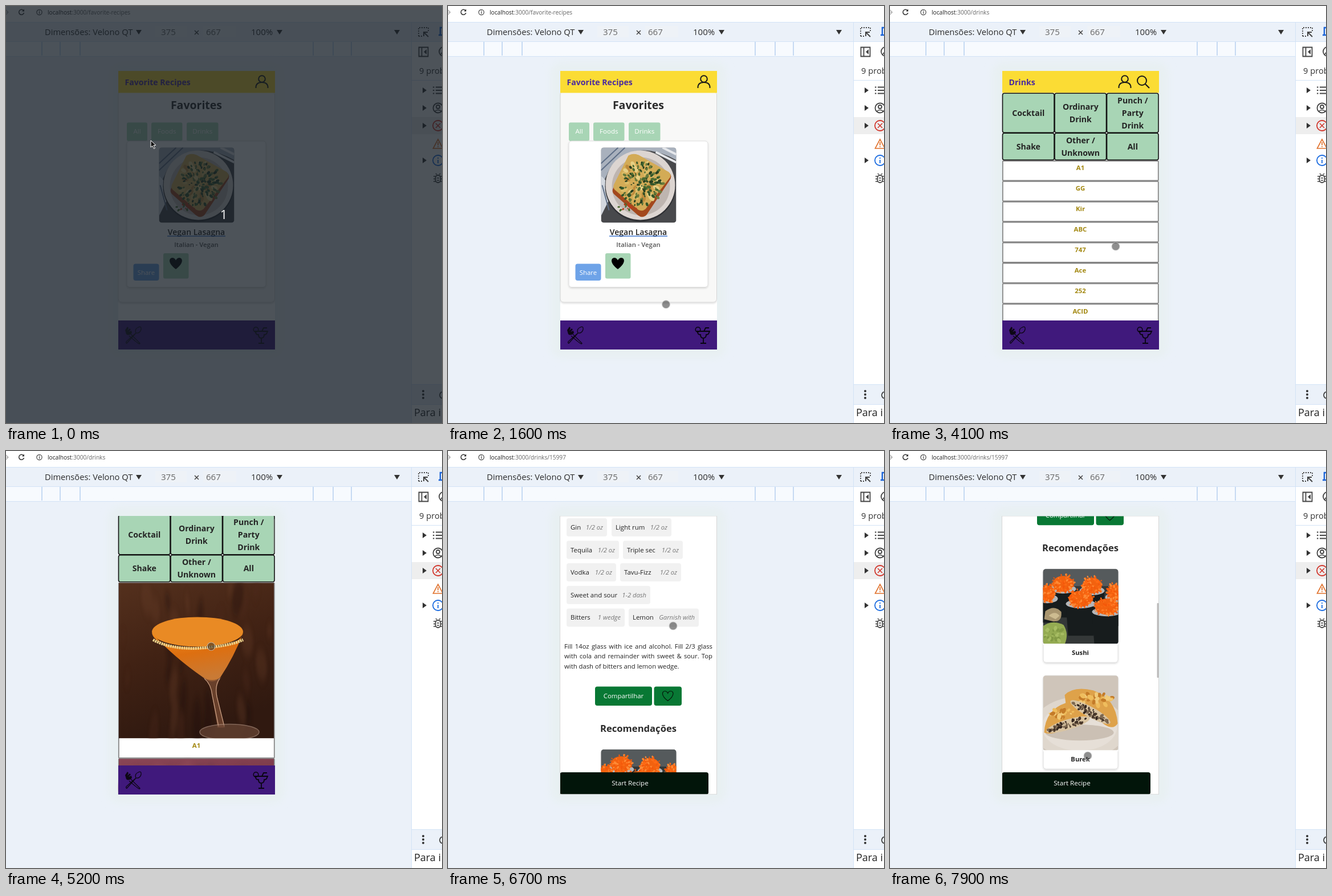
Recreate the animation shown at these times as an HTML page. Size 765 px wide and 732 px high, loop 8 s.

```html
<!DOCTYPE html>
<html lang="en">
<head>
<meta charset="utf-8">
<title>Recipe app walkthrough</title>
<style>
  html, body { margin: 0; width: 100%; height: 100%; overflow: hidden; background: #ebf1f9; }
  svg { display: block; width: 765px; height: 732px; font-family: "Open Sans", "Noto Sans", sans-serif; }
  .steps { font: 11.3px/17.7px "Open Sans", "Noto Sans", sans-serif; color: #222; white-space: nowrap; }
  .justify { text-align: justify; text-align-last: justify; white-space: normal; }
</style>
</head>
<body>
<svg id="stage" viewBox="0 0 765 732" xmlns="http://www.w3.org/2000/svg"></svg>
<script>
const rect = (x, y, w, h, fill, extra = '') =>
  `<rect x="${x}" y="${y}" width="${w}" height="${h}" fill="${fill}" ${extra}/>`;
const text = (x, y, s, size, fill = '#222', extra = '') =>
  `<text x="${x}" y="${y}" font-size="${size}" fill="${fill}" ${extra}>${s}</text>`;
const mid = (x, y, s, size, fill, extra = '') => text(x, y, s, size, fill, 'text-anchor="middle" ' + extra);
const shape = (d, fill, extra = '') => `<path d="${d}" fill="${fill}" ${extra}/>`;
const line = (d, color, w = 1.6, extra = '') => shape(d, 'none', `stroke="${color}" stroke-width="${w}" ${extra}`);
const oval = (x, y, rx, ry, fill, extra = '') =>
  `<ellipse cx="${x}" cy="${y}" rx="${rx}" ry="${ry}" fill="${fill}" ${extra}/>`;
const group = (s, extra = '') => `<g ${extra}>${s}</g>`;
const at = (x, y, s, extra = '') => group(s, `transform="translate(${x} ${y})" ${extra}`);
const bold = 'font-weight="700"', semi = 'font-weight="600"', italic = 'font-style="italic"';

function random(seed) {
  return () => (seed = (seed * 16807) % 2147483647) / 2147483647;
}

// Scatter small blobs inside an ellipse.
function specks(n, seed, cx, cy, rx, ry, size, colors) {
  const next = random(seed);
  let out = '';
  for (let i = 0; i < n; i++) {
    const a = next() * 6.283, d = Math.sqrt(next()), r = size * (0.5 + next());
    const x = cx + Math.cos(a) * d * rx, y = cy + Math.sin(a) * d * ry;
    out += oval(x.toFixed(1), y.toFixed(1), r.toFixed(1), (r * 0.65).toFixed(1),
      colors[i % colors.length], `transform="rotate(${Math.round(a * 57)} ${x.toFixed(1)} ${y.toFixed(1)})"`);
  }
  return out;
}

const userIcon = (x, y) => at(x, y,
  line('M-10.5 11v-1c0-6 4-9 10.5-9s10.5 3 10.5 9v1', '#181818', 2) +
  `<circle cy="-5" r="5.8" fill="none" stroke="#181818" stroke-width="2"/>`);
const searchIcon = at(444, 133, `<circle cx="-2" cy="-2" r="8" fill="none" stroke="#181818" stroke-width="2"/>` +
  line('M4 4l7 7', '#181818', 2.2));
const heart = 'M0 10C-15-1-12-10-6-10Q-2-10 0-5.500Q2-10 6-10C12-10 15-1 0 10Z';
const caret = (x, y) => shape(`M${x - 5} ${y - 4}h10l-5 8z`, '#333');
const arrow = y => shape(`M731 ${y - 5}l7 5l-7 5z`, '#333');
const ring = (x, y, r, color, w = 1.8) => `<circle cx="${x}" cy="${y}" r="${r}" fill="none" stroke="${color}" stroke-width="${w}"/>`;

function browser() {
  const edge = '#d3e3f6';
  return rect(0, 0, 765, 732, '#ebf1f9') + rect(0, 0, 765, 28, '#fff') + rect(0, 28, 765, 1, edge) +
    line('M-4 11h8m-4-4l4 4l-4 4', '#aaa', 1.2) +
    line('M31 8.500A4.500 4.500 0 1 0 31.500 12', '#333', 1.5) + shape('M28 9.500h4v-4z', '#333') +
    ring(58.5, 11, 4.6, '#444', 1.2) + rect(57.9, 10.3, 1.3, 3.3, '#444') + rect(57.9, 8, 1.3, 1.4, '#444') +
    `<text x="73" y="15" font-size="10.15" fill="#222">localhost<tspan id="path" fill="#666"></tspan></text>` +
    text(68, 51, 'Dimensões: Velono QT', 14.7, '#2b2b2b') + caret(233, 46) +
    rect(262, 35, 55, 20, '#eef2f7') + rect(346, 35, 58, 20, '#eef2f7') +
    text(272, 51, '375', 15, '#666') + line('M331 43l7 7m0-7l-7 7', '#444', 1.5) + text(351, 51, '667', 15, '#666') +
    text(430, 51, '100%', 15, '#2b2b2b') + caret(480, 46) + caret(686, 46) +
    rect(0, 62, 711, 27, '#f7fafe') + rect(0, 62, 765, 1, edge) + rect(0, 88, 711, 1, edge) +
    [63, 95, 130, 539, 574, 606].map(x => rect(x - 1, 63, 2, 24, '#c6daf3')).join('') +
    rect(180, 98, 308, 520, '#e8f0f2', 'rx="20" filter="url(#glow)"') + devtools(edge);
}

function devtools(edge) {
  const dark = '#454545';
  let out = rect(711, 63, 54, 669, '#fff') + rect(711, 28, 1, 704, edge) + rect(712, 130, 53, 1, edge) +
    rect(712, 195, 53, 30, '#eee') + rect(712, 664, 53, 36, '#ebf1f9') + rect(712, 664, 53, 1, edge) + rect(712, 699, 53, 1, edge);
  out += line('M724 53v-15h17v6M724 53h6', dark, 1.8, 'stroke-dasharray="2 2"') + line('M741 54l-8-8m0 7v-7h7', dark, 2);
  out += line('M768 38h-6v13m-3 0h8', '#1a63d8', 2.4);
  out += line('M724.500 72.500h16v16h-16zM729.500 72v17', dark, 1.8) + shape('M738 76v9l-5-4.500z', dark);
  out += ring(768, 80, 8, dark) + line('M762 86l8-11', dark);
  out += text(725, 119, '9 prob', 14.7, '#333') + [148, 179, 210, 271].map(arrow).join('');
  out += [142.5, 148, 153.5].map(y => rect(749, y - 1, 2.5, 2, dark) + rect(754, y - 1, 12, 2, dark)).join('');
  out += ring(758, 179, 8.5, dark) + ring(758, 177, 3, dark) + line('M752 185q6-5 12 0', dark);
  out += ring(758, 210, 9, '#d2362b') + line('M754 206l8 8m0-8l-8 8', '#d2362b');
  out += line('M758 234l8.500 16h-17z', '#e0702a') + rect(757.2, 239, 1.7, 5.5, '#e0702a') + rect(757.2, 246, 1.7, 1.8, '#e0702a');
  out += ring(758, 271, 9, '#1a6be0') + rect(757.1, 270, 1.8, 6, '#1a6be0') + rect(757.1, 266, 1.8, 2, '#1a6be0');
  out += rect(753.5, 297, 9, 13, 'none', `rx="4.500" stroke="${dark}" stroke-width="1.8"`) +
    line('M750 299h4m8 0h4m-16 4.500h4m8 0h4m-16 4.500h4m8 0h4M754 294l2 2m6-2l-2 2M756 302h4m-4 4h4', dark, 1.5);
  out += [676, 682, 688].map(y => oval(732, y, 2, 2, '#333')).join('') + ring(767, 683, 6, dark);
  return out + text(716, 720, 'Para i', 18, '#222');
}

const nav = rect(197, 552, 275, 51, '#40197c') +
  at(223, 577, line('M-4-1L11 14Q13 16 11 16Q9 16-7 2', '#0c0714', 1.3) +
    shape('M-14-8l4-6l2 2l-2 5l4-4l2 2l-4 4l5-2l1 4q-6 6-10 2z', '#0c0714') +
    line('M5-3Q2-10 9-13Q15-16 14-9Q12-2 5-3L-11 15Q-13 15-12 12Z', '#0c0714', 1.3)) +
  at(448, 577, line('M-11-6H11L9-1.500Q8 0 5 0Q5 6 0 6Q-5 6-5 0Q-8 0-9-1.500ZM0 6v9m-5 0h10M1-6l3-6h6', '#080510', 1.8) +
    ring(-9.5, -9, 4.3, '#080510', 1.6));

const header = (title, icons) => rect(197, 114, 275, 38.5, '#fbdc34') +
  text(208.5, 138.5, title, 14.1, '#4b2a9e', bold) + icons;

function lasagna() {
  return rect(0, 0, 132, 132, '#48494c') +
    shape('M0 0H132V22Q90-2 52 8Q16 24 0 72Z', '#a9b1bd') + shape('M0 50Q16 60 14 92L0 120Z', '#d3d8df') +
    line('M0 28L30 0M0 40L42 0M2 66L14 110M8 60L20 104', '#5f6f87', 2) + line('M96 8L132 26M108 0L132 12', '#e6e8ec', 4) +
    oval(69, 68, 62, 62, '#2f3034') + oval(69, 66, 61, 61, '#dcd5d1') + oval(70, 68, 51, 51, '#beb5b0') +
    shape('M48 15Q56 9 66 14L120 45Q126 50 120 58L80 118Q73 125 65 119L23 82Q18 77 22 70Z', '#a3481d') +
    shape('M48 14Q56 9 66 13L119 43Q125 49 119 55L78 108Q72 113 65 109L24 74Q20 70 23 64Z', '#d3ab56') +
    specks(40, 5, 72, 60, 36, 36, 5, ['#e6cf83', '#dcbd68', '#bf8b3c']) +
    specks(140, 17, 71, 64, 38, 39, 2.6, ['#33562a', '#4c6b32', '#283f20', '#6a7a3c']) +
    specks(16, 8, 48, 104, 20, 9, 2.4, ['#b93c1b', '#486a2d']);
}

function sushi() {
  const roll = (x, y, w, h, seed) => shape(`M${x - w} ${y}L${x - w + 4} ${y + h}H${x + w - 3}L${x + w} ${y}Z`, '#171c1d') +
    oval(x, y, w, 8, '#b4b6b9') + oval(x, y - 9, w - 5, 14, '#f2620f') +
    specks(80, seed, x, y - 9, w - 3, 17, 1.9, ['#ff6a14', '#f4580a', '#ff8a35']);
  return rect(0, 0, 132, 132, '#343838') + rect(0, 0, 132, 30, '#555a5c') +
    roll(35, 35, 23, 50, 11) + roll(86, 38, 22, 45, 23) + roll(8, 52, 18, 42, 41) + roll(126, 50, 17, 50, 35) +
    roll(66, 61, 26, 56, 59) + roll(112, 75, 26, 58, 71) +
    shape('M4 74Q20 62 32 75Q34 93 18 92L2 88Z', '#a8956f') + shape('M10 82Q21 72 29 82L22 88Z', '#cdbb90') +
    shape('M0 100Q16 88 36 98Q46 114 38 132H0Z', '#94ab52') + specks(24, 6, 18, 114, 18, 14, 3, ['#a7bd63', '#829a45']);
}

function burek() {
  const crust = ['#efbd5d', '#c47b28', '#f1ca78'], meat = ['#33261f', '#4b392c', '#7c6750'];
  const slice = (outline, top, seed, cx, cy, angle) => shape(outline, '#dea24a') + top +
    group(oval(cx, cy, 40, 9, '#d9c4a2') + specks(60, seed, cx, cy, 36, 6, 2.4, meat), `transform="rotate(${angle} ${cx} ${cy})"`);
  return rect(0, 0, 132, 132, '#cfc5ba') + oval(64, 92, 82, 55, '#dfd7cd') + oval(64, 90, 66, 42, '#e6dfd7') +
    oval(64, 100, 60, 14, '#cbc0b4') +
    slice('M2 100Q4 60 40 48Q64 44 84 68Q70 84 42 92Q14 106 2 100Z', specks(24, 31, 32, 65, 22, 9, 4, crust), 9, 44, 86, -17) +
    slice('M38 34Q54 18 88 26Q128 40 131 84Q124 96 108 86Q72 58 40 50Z', specks(30, 13, 92, 42, 30, 11, 4, crust), 29, 83, 64, 29);
}

const photo = (x, y, art) => at(x, y, art, 'clip-path="url(#square)"');

function favorites() {
  const tab = (x, w, s) => rect(x, 204.5, w, 32.5, '#a8d5b5', 'rx="3"') + mid(x + w / 2, 224, s, 11.6, '#fff');
  return rect(197, 114, 275, 489, '#fff') +
    rect(197, 150, 274.5, 370, '#f8f8f7', 'rx="6" stroke="#d5d5d5" filter="url(#shadow)"') +
    header('Favorite Recipes', userIcon(449, 133)) + mid(334, 181, 'Favorites', 19.5, '#2b2b2b', bold) +
    tab(212, 36, 'All') + tab(255, 54.5, 'Foods') + tab(317, 55.5, 'Drinks') +
    rect(212, 237, 244, 256.5, '#fff', 'rx="5" stroke="#ddd" filter="url(#shadow)"') +
    photo(268.5, 248.5, lasagna()) +
    mid(334, 402, 'Vegan Lasagna', 14, '#222', semi) + rect(283, 403.3, 102, 1.3, '#2463c8') +
    mid(334, 423, 'Italian - Vegan', 11.3, '#555', semi) +
    rect(223.5, 452.5, 45, 29.5, '#6ea3e8', 'rx="4"') + mid(246, 471.5, 'Share', 11.4, '#fff') +
    rect(276, 434, 44.5, 44.5, '#a8d5b5', 'rx="3"') + at(298, 452, shape(heart, '#000')) + nav;
}

function martini() {
  const grain = group(specks(50, 53, 272, 28, 260, 130, 16, ['#69402a', '#1a0d08', '#4f2c1a']),
    'opacity=".3" filter="url(#soft)" transform="translate(198 300) scale(.5 2)"');
  return group(rect(198, 272, 272, 273, 'url(#wood)') + grain +
    oval(336, 358, 80, 26, '#e98a24') +
    shape('M256 360Q262 386 336 386Q410 386 416 360Q400 402 376 438Q362 452 346 438Q294 402 256 360Z', 'url(#juice)') +
    shape('M344 437Q362 448 378 437Q367 452 370 470L384 526H371L361 466Q359 448 344 437Z', '#7a4c34', 'opacity=".75"') +
    line('M348 440Q360 450 362 470L373 524M375 440Q366 452 370 472L383 524', '#c79c80', 1.3) +
    line('M258 372Q288 388 334 387Q390 384 416 372', '#edd28b', 5, 'stroke-dasharray="3 1"') +
    oval(392, 534, 52, 14, '#75503f', 'opacity=".6" stroke="#b99a88" stroke-width="1.500"'), 'clip-path="url(#firstPhoto)"');
}

function tumbler() {
  let ridges = '';
  for (let i = 0; i < 24; i++) {
    const y = 692 + i * 5, half = 73 - i * 1.25;
    ridges += `M${335 - half} ${y}Q335 ${y + 13} ${335 + half} ${y}`;
  }
  const mottle = (seed, y, ry, colors) => group(specks(70, seed, 334, y, 132, ry, 9, colors), 'opacity=".3" filter="url(#soft)"');
  return rect(198, 581, 272, 104, 'url(#wall)') + mottle(77, 630, 42, ['#9a5260', '#5f3546']) +
    rect(198, 685, 272, 170, 'url(#table)') + mottle(37, 748, 50, ['#d29552', '#94592b']) +
    shape('M254 660Q335 700 416 660L382 800Q335 820 288 800Z', '#c09a62', 'opacity=".85"') +
    shape('M266 690Q335 704 404 690L380 798Q335 814 291 798Z', 'url(#drink)') +
    oval(335, 658, 80, 27, '#9c6858', 'stroke="#c8a596" stroke-width="2.500"') + oval(335, 670, 68, 16, '#bf9760') +
    group(specks(14, 19, 342, 672, 40, 10, 11, ['#dcc697', '#b08a50', '#cfb585']), 'opacity=".65"') +
    group(oval(350, 714, 30, 30, '#d9c084') + oval(345, 775, 26, 22, '#a87c0c'), 'opacity=".7" filter="url(#soft)"') +
    line(ridges, '#e0cb92', 1, 'opacity=".5"') +
    line('M256 668L290 800M414 668L382 800', '#d6b892', 2, 'opacity=".6"');
}

function drinks() {
  const cell = (x, y, h, ...rows) => rect(x, y, 90.5, h, '#a8d5b5', 'rx="3" stroke="#111" stroke-width="1.6"') +
    rows.map((s, i) => mid(x + 45.3, y + h / 2 + 5 + (i - (rows.length - 1) / 2) * 22, s, 14.1, '#242424', bold)).join('');
  const row = (y, h, name) => rect(197.8, y + 1, 273, h - 1.5, '#fff', 'rx="1" stroke="#858585" stroke-width="1.8"') +
    mid(334, y + h - 18.5, name, 11.4, '#a2870f', bold);
  const names = ['A1', 'GG', 'Kir', 'ABC', '747', 'Ace', '252', 'ACID'];
  return rect(197, 114, 275, 489, '#fff') + group(
    header('Drinks', userIcon(412, 133) + searchIcon) +
    group(cell(197.5, 153.3, 69, 'Cocktail') + cell(289, 153.3, 69, 'Ordinary', 'Drink') +
      cell(380.5, 153.3, 69, 'Punch /', 'Party', 'Drink') + cell(197.5, 223.3, 47, 'Shake') +
      cell(289, 223.3, 47, 'Other /', 'Unknown') + cell(380.5, 223.3, 47, 'All') +
      group(names.map((s, i) => row(271 + i * 35.9, 35.9, s)).join(''), 'id="rows"') +
      group(row(271, 309, 'A1') + martini() + row(580, 309, 'GG') + tumbler(), 'id="cards"'), 'id="list"'),
    'id="drinkPage"') + nav;
}

function detail() {
  const chip = (x, y, w, name, amount) => rect(x, y, w, 32, '#f1f1f1', 'rx="4"') + text(x + 7, y + 20, name, 11.4) +
    text(x + w - 7, y + 20, amount, 11.2, '#777', 'text-anchor="end" ' + italic);
  const card = (y, art, name) => rect(269, y, 131, 164, '#fff', 'rx="5" stroke="#ddd" filter="url(#shadow)"') +
    photo(268.5, y, art) + rect(268.5, y + 131, 132, 2, '#fff') + mid(334, y + 151, name, 11.2, '#222', bold);
  const content = chip(208, 118, 71, 'Gin', '1/2 oz') + chip(287, 118, 105, 'Light rum', '1/2 oz') +
    chip(208, 157.5, 92, 'Tequila', '1/2 oz') + chip(307, 157.5, 105, 'Triple sec', '1/2 oz') +
    chip(208, 197, 87, 'Vodka', '1/2 oz') + chip(302, 197, 107, 'Tavu-Fizz', '1/2 oz') +
    chip(208, 236.8, 147, 'Sweet and sour', '1-2 dash') +
    chip(208, 276.4, 102, 'Bitters', '1 wedge') + chip(317, 276.4, 123, 'Lemon', 'Garnish with') +
    `<foreignObject x="204" y="333.500" width="260" height="60"><div class="steps" xmlns="http://www.w3.org/1999/xhtml">
      <div class="justify">Fill 14oz glass with ice and alcohol. Fill 2/3 glass</div>
      <div class="justify">with cola and remainder with sweet &amp; sour. Top</div>
      <div>with dash of bitters and lemon wedge.</div></div></foreignObject>` +
    rect(258, 413.5, 100, 33.5, '#087834', 'rx="4"') + mid(308, 434, 'Compartilhar', 11.4, '#fff') +
    rect(361.5, 413.5, 48.5, 33.5, '#087834', 'rx="4"') + at(385.7, 430, shape(heart, 'none', 'stroke="#04150a" stroke-width="1.400" transform="scale(.85)"')) +
    mid(334, 492.5, 'Recomendações', 16.6, '#2b2b2b', bold) + card(524, sushi(), 'Sushi') + card(711, burek(), 'Burek');
  return rect(197, 114, 275, 489, '#fff') + group(content, 'id="recipe"') +
    rect(196.5, 564, 260.5, 39, '#02150a', 'rx="4"') + mid(319.5, 587, 'Start Recipe', 11.6, '#fff') +
    rect(196.5, 114, 275, 488.7, 'none', 'stroke="#d6d6d6"');
}

const gradient = (id, a, b, c) => `<linearGradient id="${id}" x2=".3" y2="1"><stop stop-color="${a}"/><stop offset=".5" stop-color="${b}"/><stop offset="1" stop-color="${c}"/></linearGradient>`;
const stage = document.getElementById('stage');
stage.innerHTML = `<defs>
  <clipPath id="screen">${rect(196, 114, 276, 489, '#000')}</clipPath>
  <clipPath id="square">${rect(0, 0, 132, 132, '#000', 'rx="5"')}</clipPath>
  <clipPath id="firstPhoto">${rect(198, 272, 272, 273, '#000')}</clipPath>
  <filter id="glow" x="-20%" y="-20%" width="140%" height="140%"><feGaussianBlur stdDeviation="7"/></filter>
  <filter id="soft" x="-20%" y="-20%" width="140%" height="140%"><feGaussianBlur stdDeviation="4"/></filter>
  <filter id="shadow"><feDropShadow dx="0" dy="1.500" stdDeviation="1.800" flood-opacity=".15"/></filter>` +
  gradient('wood', '#54301d', '#412214', '#301910') + gradient('juice', '#f08a1d', '#dd6f10', '#c97a35') +
  gradient('wall', '#8a4555', '#7b3a49', '#74384a') + gradient('table', '#b56e36', '#bb7b3d', '#b28345') +
  gradient('drink', '#c3a062', '#bd9540', '#b0800f') + '</defs>' +
  browser() + group(group(favorites(), 'id="favorites"') + group(drinks(), 'id="drinks"') +
    group(detail(), 'id="detail"') + rect(468.5, 0, 3, 131, '#aaa', 'id="thumb" opacity=".8" rx="1"'), 'clip-path="url(#screen)"') +
  at(0, 0, `<circle r="7" fill="#1e1e1e" fill-opacity=".5" stroke="#ccc" stroke-opacity=".7" stroke-width="1.200"/>`, 'id="finger"') +
  group(rect(0, 0, 765, 732, '#161e26', 'id="shade"') +
    group(shape('M254 236v12l3-2.500l2.500 5l2-1l-2.500-5h4z', '#111', 'stroke="#fff"') + mid(382, 374, '1', 22, '#fff'), 'id="count"'), 'id="intro"');

const el = id => document.getElementById(id);
const show = (id, on) => el(id).setAttribute('display', on ? 'inline' : 'none');
const smooth = (t, a, b) => { const p = Math.min(1, Math.max(0, (t - a) / (b - a))); return p * p * (3 - 2 * p); };

const touchPath = [[0, 254, 236], [500, 283, 304], [1000, 291, 421], [1800, 413, 558], [2300, 448.5, 573.5],
  [3600, 448.5, 573.5], [4100, 396, 422], [4500, 360, 343], [6500, 360, 343], [6700, 395, 307], [6900, 395, 307],
  [7800, 391, 510], [7900, 347, 535]];

function touchAt(t) {
  const i = Math.max(1, touchPath.findIndex(k => k[0] >= t));
  const [a, b] = [touchPath[i - 1], touchPath[i]];
  const p = (t - a[0]) / (b[0] - a[0]);
  return [a[1] + (b[1] - a[1]) * p, a[2] + (b[2] - a[2]) * p];
}

function draw(now) {
  const t = Math.floor((now % 8000) / 100) * 100;
  const page = t < 3400 ? 'favorites' : t < 6000 ? 'drinks' : 'detail';
  ['favorites', 'drinks', 'detail'].forEach(id => show(id, id === page));
  el('path').textContent = ':3000/' + { favorites: 'favorite-recipes', drinks: 'drinks', detail: 'drinks/15997' }[page];

  const listScroll = 260 * smooth(t, 5100, 5500), recipeScroll = 316.8 * smooth(t, 6900, 7800);
  show('list', t >= 3700);
  show('rows', t < 4600);
  show('cards', t >= 4600);
  show('recipe', t >= 6600);
  el('drinkPage').setAttribute('transform', `translate(0 ${-listScroll})`);
  el('recipe').setAttribute('transform', `translate(0 ${-recipeScroll})`);

  show('thumb', (t >= 5200 && t < 6000) || t >= 7000);
  const inList = page === 'drinks';
  el('thumb').setAttribute('y', inList ? 114 + listScroll * 0.13 : 114 + (254 + recipeScroll) * 0.268);
  el('thumb').setAttribute('height', inList ? 60 : 131);
  el('thumb').setAttribute('opacity', inList ? 0.4 : 0.8);

  el('finger').setAttribute('transform', `translate(${touchAt(t)})`);
  show('finger', t > 0);
  show('intro', t < 200);
  show('count', t < 100);
  el('shade').setAttribute('opacity', 0.76 * (1 - t / 200));
}

const start = performance.now();
function tick() {
  draw(performance.now() - start);
  requestAnimationFrame(tick);
}
tick();
</script>
</body>
</html>
```
